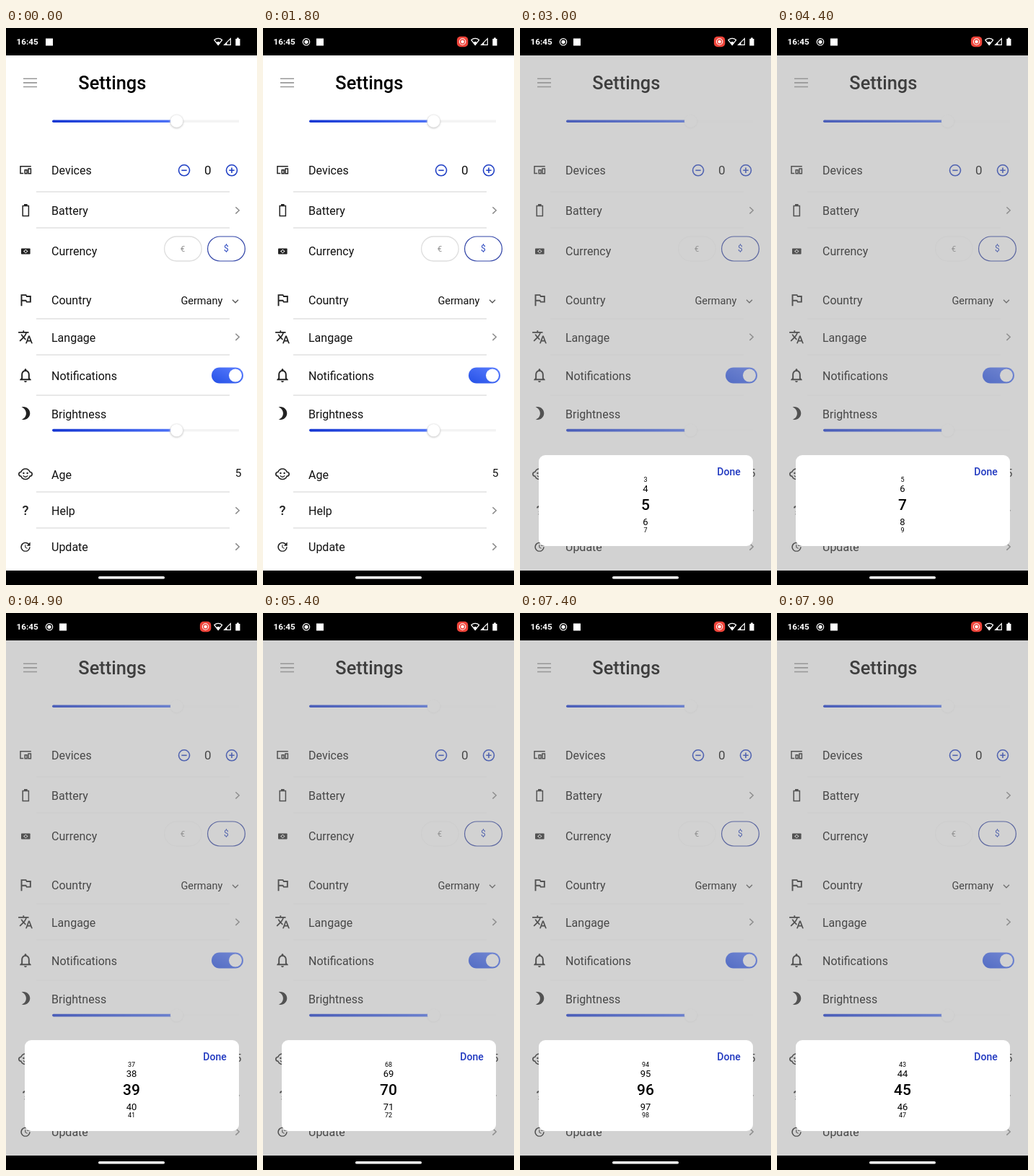
Animation of 348 by 772 pixels, one loop 8000 ms. Source, as an HTML page:

```html
<!DOCTYPE html>
<html lang="en">
<head>
<meta charset="utf-8">
<title>Settings</title>
<style>
  html, body { margin: 0; width: 100%; height: 100%; overflow: hidden; background: #000; }
  svg { display: block; width: 100vw; height: 100vh; }
  text { font-family: Roboto, Arial, sans-serif; white-space: pre; }
  .mid { text-anchor: middle; }
  .line { fill: none; stroke-linecap: butt; }
  .shadow { filter: blur(1px); }
</style>
</head>
<body>
<svg viewBox="0 0 348 772" xmlns="http://www.w3.org/2000/svg">
  <defs>
    <linearGradient id="bar" gradientUnits="userSpaceOnUse" x1="64" y1="0" x2="237" y2="0">
      <stop offset="0" stop-color="#1637d2"/><stop offset="1" stop-color="#4f74f8"/>
    </linearGradient>
    <linearGradient id="switch" x1="0" y1="1" x2="1" y2="0">
      <stop offset="0" stop-color="#2450e6"/><stop offset="1" stop-color="#5c7fff"/>
    </linearGradient>
    <clipPath id="app"><rect y="38" width="348" height="714"/></clipPath>
    <g id="slider">
      <path class="line faint" d="M237 0H323" stroke="#f3f3f3" stroke-width="3.4"/>
      <path class="line" d="M66 0H236" stroke="url(#bar)" stroke-width="3.6"/>
      <circle cx="65.8" r="1.8" fill="#1637d2"/>
    </g>
    <g id="thumb">
      <circle class="shadow" cy=".7" r="9.4" fill="#cfcfcf"/>
    </g>
    <path id="next" class="line" d="M-2.6 -4.6L2.2 0L-2.6 4.6" stroke="#8a8a8a" stroke-width="1.5"/>
  </defs>

  <rect width="348" height="772"/>

  <g clip-path="url(#app)">
    <rect y="38" width="348" height="714" fill="#fff"/>
    <path class="line" d="M24 70.3H43M24 75.9H43M24 81.5H43" stroke="#999" stroke-width="1.6"/>
    <text x="100.3" y="84.7" font-size="25.4" font-weight="500">Settings</text>

    <g id="sliders"></g>
    <g id="dividers" class="faint" fill="none" stroke="#e0e0e0" stroke-width="1.6"></g>
    <g id="labels" font-size="16" fill="#111"></g>
    <g id="chevrons"></g>

    <g class="line" stroke="#1f3fc4" stroke-width="1.6">
      <circle cx="247" cy="197.3" r="7.5"/><path d="M243.3 197.3H250.7"/>
      <circle cx="313" cy="197.3" r="7.5"/><path d="M309.3 197.3H316.7M313 193.6V201"/>
    </g>
    <text class="mid" x="279.7" y="203.3" font-size="17" fill="#111">0</text>

    <rect class="line faint" x="219.6" y="289" width="51.6" height="34" rx="17" stroke="#dedede" stroke-width="1.3"/>
    <rect class="line" x="279.6" y="289" width="51.8" height="34" rx="17" stroke="#3346a8" stroke-width="1.2"/>
    <text class="mid" x="245" y="309.8" font-size="11.5" fill="#8d8d8d">€</text>
    <text class="mid" x="305.4" y="310.2" font-size="12" fill="#2b48c0">$</text>

    <text x="242.4" y="383.4" font-size="14.5" fill="#111">Germany</text>
    <path class="line" d="M314 376.8L318 380.8L322 376.8" stroke="#555" stroke-width="1.3"/>

    <rect x="285" y="470.5" width="44" height="22" rx="11" fill="url(#switch)"/>
    <circle cx="318" cy="481.6" r="9" fill="#fff"/>
    <text class="mid" x="322" y="622.4" font-size="15.5" fill="#111">5</text>

    <!-- row icons drawn by hand -->
    <g class="line" stroke="#222" stroke-width="1.5">
      <path d="M34.8 191.8H20V201.6H24.2M26.2 201.7V196.8H29V201.7ZM31 195H34.4V201.7H31Z"/>
      <path d="M23.2 246.6H31.4V260.4H23.2Z"/>
      <path d="M25 245.2H29.6" stroke-width="2.4"/>
    </g>
    <rect x="21" y="305.4" width="12.6" height="8.2" rx=".8" fill="#222"/>
    <path d="M27.3 306.7L30.6 309.5L27.3 312.3L24 309.5Z" fill="#fff"/>
    <circle cx="27.3" cy="309.5" r="1.5" fill="#222"/>
    <g class="line" stroke="#222" stroke-width="1.6">
      <path d="M20.9 615.2C22 612.4 24.3 611 27 611S32 612.4 33.1 615.2C35 615.4 36.2 616.7 36.2 618.2S35 621 33.1 621.2C32 624 29.7 625.5 27 625.5S22 624 20.9 621.2C19 621 17.8 619.7 17.8 618.2S19 615.4 20.9 615.2Z"/>
      <path d="M23.8 620.4Q27 624.2 30.2 620.4" stroke-width="1.4"/>
    </g>
    <circle cx="24.4" cy="617" r="1.2" fill="#222"/>
    <circle cx="29.6" cy="617" r="1.2" fill="#222"/>
    <text class="mid" x="27" y="675.2" font-size="18.5" font-weight="500" fill="#222">?</text>
    <g id="icons" fill="#222"></g>

    <rect id="veil" y="38" width="348" height="714" fill="#949494" opacity="0"/>

    <g id="card">
      <rect x="26" y="592" width="297" height="126" rx="9" fill="#fff"/>
      <text x="273.3" y="619.6" font-size="14" font-weight="500" fill="#2038c0">Done</text>
      <g id="wheel" class="mid" fill="#000"></g>
    </g>
  </g>

  <!-- status bar -->
  <text x="14.6" y="23.4" font-size="11.7" font-weight="700" fill="#fff">16:45</text>
  <g id="target">
    <circle cx="60" cy="19.3" r="4.7" fill="none" stroke="#fff" stroke-width="1.2"/>
    <circle cx="60" cy="19.3" r="2.6" fill="#fff"/>
  </g>
  <rect id="badge" x="-5" y="14.5" width="10" height="10" fill="#fff"/>
  <g id="rec">
    <rect x="-7.7" y="-7.2" width="15.4" height="14.4" rx="5" fill="#f0443a"/>
    <circle r="4.2" fill="none" stroke="#fff" stroke-width="1.1"/>
    <circle r="2.2" fill="#fff"/>
  </g>
  <path d="M288.8 16.6Q294.2 12.2 299.6 16.6L294.2 23.6Z" fill="none" stroke="#fff" stroke-width="1.3" stroke-linejoin="round"/>
  <path d="M291.6 20L294.2 18.8L296.8 20L294.2 23.6Z" fill="#fff"/>
  <path d="M311.3 14.6V23.4H302.6Z" fill="none" stroke="#fff" stroke-width="1.2"/>
  <path d="M306.4 19.6V23.4H302.6Z" fill="#fff"/>
  <path d="M318.3 15H320V13.6H322.8V15H324.5V24.4H318.3Z" fill="#fff"/>
  <rect x="128" y="759.9" width="92" height="3.6" rx="1.8" fill="#fff"/>
</svg>

<script>
const LOOP = 8000, STEP = 100;
const $ = id => document.getElementById(id);

function add(parent, tag, attrs, text) {
  const el = document.createElementNS('http://www.w3.org/2000/svg', tag);
  for (const key in attrs) el.setAttribute(key, attrs[key]);
  if (text) el.textContent = text;
  $(parent).appendChild(el);
  return el;
}

const rows = {
  Devices: 203, Battery: 259, Currency: 315, Country: 383, Langage: 434.5,
  Notifications: 487.8, Brightness: 540.7, Age: 625, Help: 674.7, Update: 724.6
};
for (const name in rows) add('labels', 'text', { x: 63, y: rows[name] }, name);
for (const y of [227, 277, 403, 453, 509, 643, 693]) add('dividers', 'path', { d: `M42 ${y}H310` });
for (const y of [252.8, 428.3, 668.8, 719]) add('chevrons', 'use', { href: '#next', transform: `translate(321 ${y})` });
for (const y of [129.2, 557.6]) {
  const transform = `translate(0 ${y})`;
  add('sliders', 'use', { href: '#slider', transform });
  add('sliders', 'use', { href: '#thumb', class: 'faint', transform: `translate(236.6 ${y})` });
  add('sliders', 'circle', { cx: 236.6, cy: y, r: 8.6, fill: '#fff' });
}

// icons on a 24 unit grid: centre x, centre y, scale, outline
const icons = [
  [27.2, 376.8, .95, 'M14 6l-1-2H5v17h2v-7h5l1 2h7V6h-6zm4 8h-4l-1-2H7V6h5l1 2h5v6z'],
  [27, 428.2, .9, 'M12.87 15.07l-2.54-2.51.03-.03c1.74-1.94 2.98-4.17 3.71-6.53H17V4h-7V2H8v2H1v1.99h11.17C11.5 7.92 10.44 9.75 9 11.35 8.07 10.32 7.3 9.19 6.69 8h-2c.73 1.63 1.73 3.17 2.98 4.56l-5.09 5.02L4 19l5-5 3.11 3.11.76-2.04zM18.5 10h-2L12 22h2l1.12-3h4.75L21 22h2l-4.5-12zm-2.62 7l1.62-4.33L19.12 17h-3.24z'],
  [27, 481.4, .97, 'M12 22c1.1 0 2-.9 2-2h-4c0 1.1.9 2 2 2zm6-6v-5c0-3.07-1.63-5.64-4.5-6.32V4c0-.83-.67-1.5-1.5-1.5s-1.5.67-1.5 1.5v.68C7.64 5.36 6 7.92 6 11v5l-2 2v1h16v-1l-2-2zm-2 1H8v-6c0-2.48 1.51-4.5 4-4.5s4 2.02 4 4.5v6z'],
  [27, 534, .9, 'M9 2c-1.05 0-2.05.16-3 .46 4.06 1.27 7 5.06 7 9.54 0 4.48-2.94 8.27-7 9.54.95.3 1.95.46 3 .46 5.52 0 10-4.48 10-10S14.52 2 9 2z'],
  [27, 719.2, .74, 'M21 10.12h-6.78l2.74-2.82c-2.73-2.7-7.15-2.8-9.88-.1-2.73 2.71-2.73 7.08 0 9.79s7.15 2.71 9.88 0C18.32 15.65 19 14.08 19 12.1h2c0 1.98-.88 4.55-2.64 6.29-3.51 3.48-9.21 3.48-12.72 0-3.5-3.47-3.53-9.11-.02-12.58s9.14-3.47 12.65 0L21 3v7.12zM12.5 8v4.25l3.5 2.08-.72 1.21L11 13V8h1.5z']
];
for (const [x, y, s, d] of icons)
  add('icons', 'path', { d, transform: `translate(${x} ${y}) scale(${s}) translate(-12 -12)` });

// number wheel: offset from the chosen value, baseline, size
const slots = [[-2, 629.2, 9], [-1, 643.1, 13], [0, 668.4, 21], [1, 688.7, 13], [2, 699.3, 9]]
  .map(([offset, y, size]) => ({
    offset,
    el: add('wheel', 'text', { x: 174, y, 'font-size': size, 'font-weight': offset ? 400 : 500 })
  }));

const clamp = v => Math.max(0, Math.min(1, v));
const part = (t, from, to) => clamp((t - from) / (to - from));
const linear = k => k;
const smooth = k => k * k * (3 - 2 * k);
const out = k => 1 - (1 - k) ** 3;

// swipes: start, end, first value, last value, easing
const swipes = [
  [4400, 5400, 7, 70, smooth],
  [5600, 6300, 71, 78, linear],
  [6300, 6600, 78, 100, linear],
  [7400, 7900, 96, 45, linear]
];
function valueAt(t) {
  let value = 5;
  for (const [start, end, a, b, ease] of swipes)
    if (t >= start) value = Math.round(a + (b - a) * ease(part(t, start, end)));
  return value;
}

const faint = document.querySelectorAll('.faint');

function draw(t) {
  const intro = out(part(t, 0, 400));
  $('badge').setAttribute('transform', `translate(${60 + 19 * intro} 0)`);
  $('target').setAttribute('opacity', part(t, 100, 400));
  $('rec').setAttribute('transform', `translate(276.6 19) scale(${intro})`);

  $('veil').setAttribute('opacity', .42 * part(t, 1800, 2400));
  $('card').setAttribute('transform', `translate(0 ${160 * (1 - out(part(t, 1850, 2200)))})`);
  const fade = 1 - .4 * part(t, 1800, 2400) - (t >= 3000 ? .35 : 0);
  for (const el of faint) el.setAttribute('opacity', fade);

  const value = valueAt(t);
  for (const { offset, el } of slots) {
    const n = value + offset;
    el.textContent = n <= 100 ? n : '';
  }
}

const begin = performance.now();
function tick() {
  const t = (performance.now() - begin) % LOOP;
  draw(Math.floor(t / STEP) * STEP);
  requestAnimationFrame(tick);
}
draw(0);
requestAnimationFrame(tick);
</script>
</body>
</html>
```
